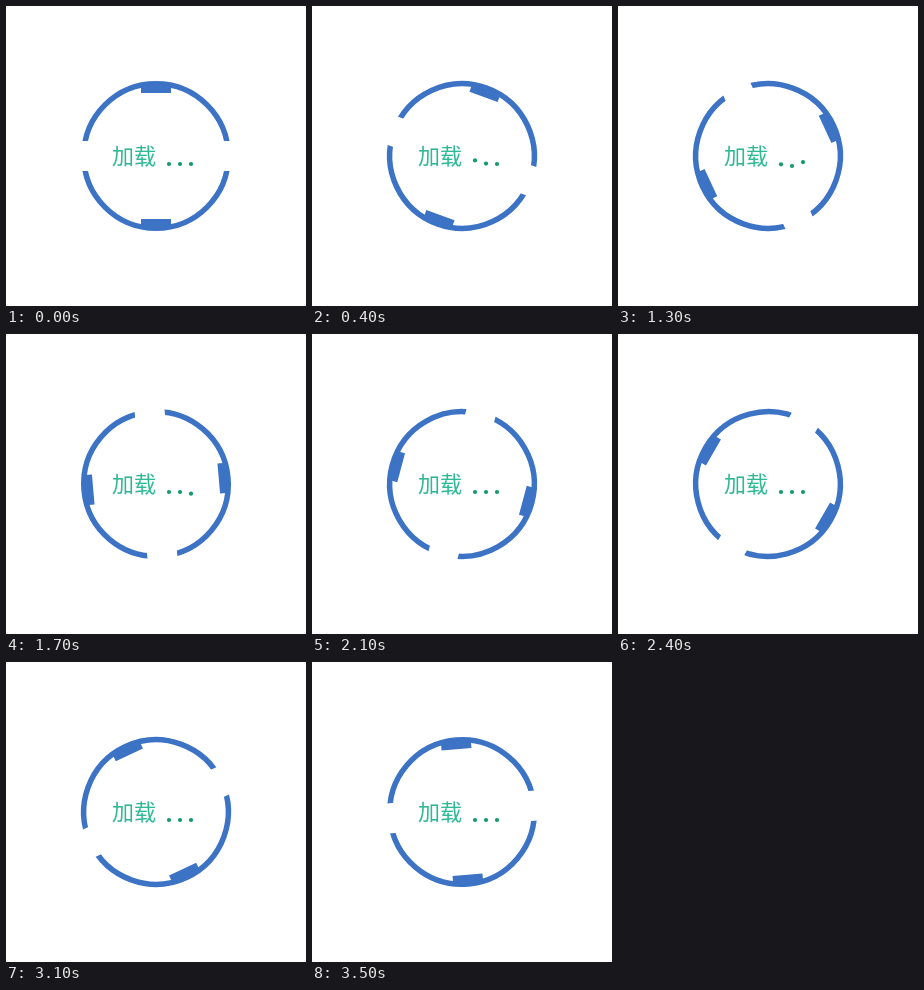
Recreate the animation shown at these times as an HTML page. Size 300x300 px, loop 3600 ms.

```html
<!DOCTYPE html>
<html lang="zh-CN">
<head>
<meta charset="utf-8">
<style>
  html, body { margin: 0; width: 100%; height: 100%; overflow: hidden; background: #fff; }
  svg { display: block; width: 100vw; height: 100vh; }
  text { font: 300 22px "Noto Sans CJK SC", "Noto Sans CJK", sans-serif; fill: #2fb994; }
</style>
</head>
<body>
<svg viewBox="0 0 300 300">
  <defs>
    <clipPath id="halves"><path d="M70 70H230V135H70ZM70 165H230V230H70Z"/></clipPath>
  </defs>
  <g id="ring">
    <g clip-path="url(#halves)">
      <circle cx="150" cy="150" r="72.25" fill="none" stroke="#3c73c4" stroke-width="5.5"/>
      <path d="M135 78H165V87H135ZM135 213H165V222H135Z" fill="#3c73c4"/>
    </g>
  </g>
  <text x="106" y="157.5">加载</text>
  <g id="dots" fill="#12996d">
    <circle cx="163" r="2.1"/><circle cx="174" r="2.1"/><circle cx="185" r="2.1"/>
  </g>
</svg>
<script>
  const LOOP = 3600, STEP = 100, DELAY = 300;
  const ring = document.getElementById('ring');
  const dots = [...document.getElementById('dots').children];
  // [time, height] of one hop: up, below the line, back to rest
  const hop = [[0, 158], [500, 154], [1000, 160], [1400, 158]];

  function hopY(t) {
    for (let i = 1; i < hop.length; i++) {
      const [t0, y0] = hop[i - 1], [t1, y1] = hop[i];
      if (t >= t0 && t < t1) {
        const p = (1 - Math.cos(Math.PI * (t - t0) / (t1 - t0))) / 2;
        return y0 + (y1 - y0) * p;
      }
    }
    return 158;
  }

  function draw(now) {
    const t = Math.floor(now % LOOP / STEP) * STEP;
    ring.setAttribute('transform', `rotate(${t / 20} 150 150)`);
    dots.forEach((dot, i) => dot.setAttribute('cy', hopY(t - i * DELAY)));
  }

  let start;
  function tick(now) {
    start ??= now;
    draw(now - start);
    requestAnimationFrame(tick);
  }
  draw(0);
  requestAnimationFrame(tick);
</script>
</body>
</html>
```
